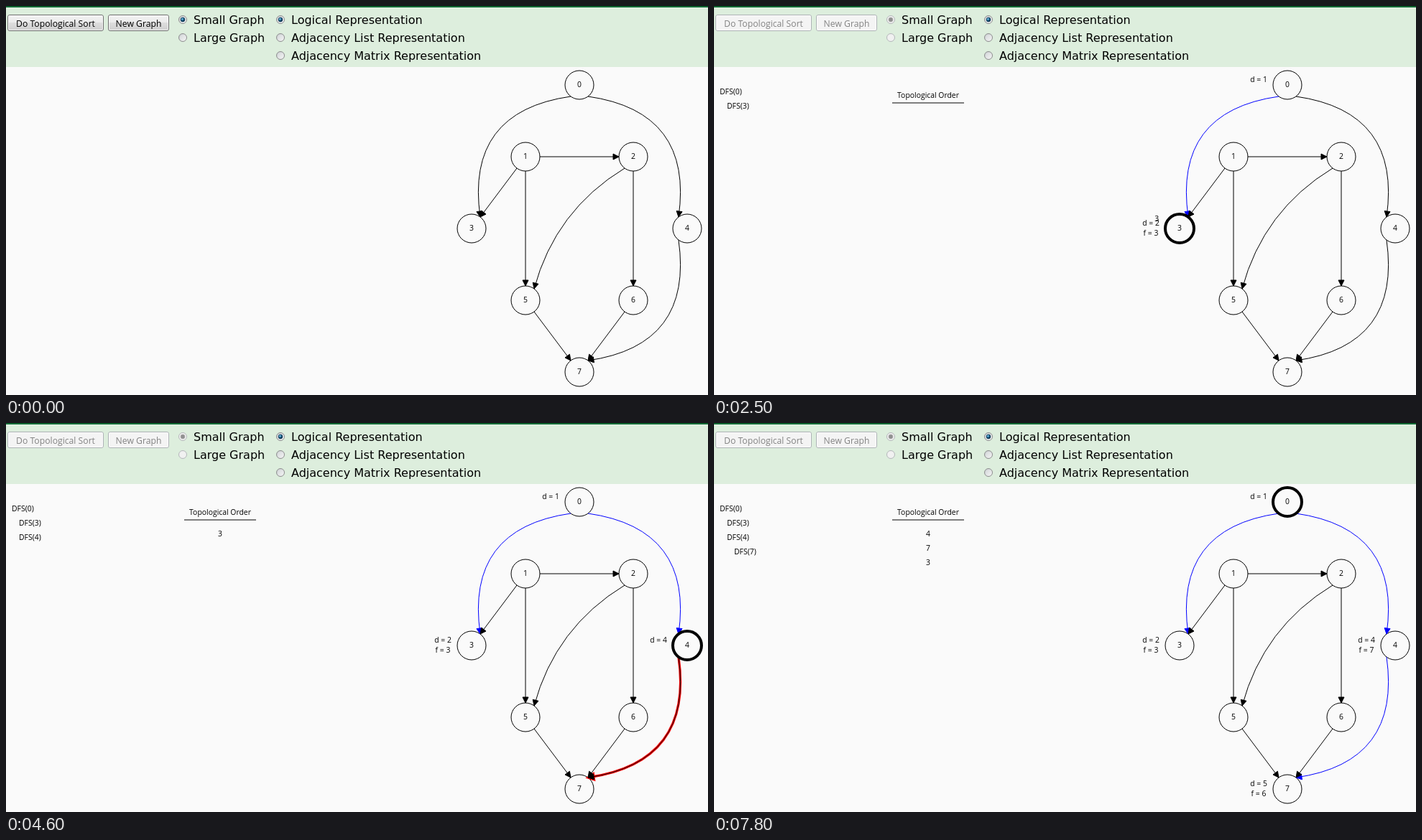
Write an HTML page that moves like this. It is 977 px wide and 542 px high and loops after 8 s.

```html
<!DOCTYPE html>
<html lang="en">
<head>
<meta charset="utf-8">
<title>Topological sort</title>
<style>
  html, body { margin: 0; width: 100%; height: 100%; overflow: hidden; background: #fafafa; }
  svg { display: block; }
  text { font: 10.4px "Open Sans", "Noto Sans", sans-serif; fill: #000; }
  .mid { text-anchor: middle; }
  .option { font: 16px "DejaVu Sans", Verdana, sans-serif; }
  .button rect { fill: url(#face); stroke: #707070; }
  .button text { font-size: 12.2px; text-anchor: middle; }
  .button.hover rect { fill: url(#faceHover); stroke: #3c7fb1; }
  .button.off rect { fill: #f4f4f4; stroke: #adb2b5; }
  .button.off text { fill: #838383; }
  .radio .rim { fill: url(#dish); stroke: #8e8f8f; }
  .radio .dot { fill: url(#bead); stroke: #14405e; stroke-width: .8; }
  .radio.off .rim { fill: #f0f0f0; stroke: #b4b8ba; }
  .radio.off .dot { fill: #909090; stroke: #a4a4a4; }
  .node circle { fill: none; stroke: #000; }
  .edge path { stroke-miterlimit: 10; }
  .line { fill: none; }
</style>
</head>
<body>
<svg id="stage" width="977" height="542" viewBox="0 0 977 542">
  <defs>
    <linearGradient id="face" x2="0" y2="1">
      <stop offset="0" stop-color="#f2f2f2"/><stop offset=".5" stop-color="#ebebeb"/>
      <stop offset=".5" stop-color="#ddd"/><stop offset="1" stop-color="#cfcfcf"/>
    </linearGradient>
    <linearGradient id="faceHover" x2="0" y2="1">
      <stop offset="0" stop-color="#eaf6fd"/><stop offset=".5" stop-color="#d9f0fc"/>
      <stop offset=".5" stop-color="#bee6fd"/><stop offset="1" stop-color="#a7d9f5"/>
    </linearGradient>
    <linearGradient id="dish" x2="1" y2="1">
      <stop offset="0" stop-color="#c4c8cc"/><stop offset="1" stop-color="#f8f8f8"/>
    </linearGradient>
    <radialGradient id="bead" cx=".38" cy=".35">
      <stop offset="0" stop-color="#a5dcf5"/><stop offset=".5" stop-color="#2d7fae"/>
      <stop offset="1" stop-color="#0d3550"/>
    </radialGradient>
  </defs>
  <rect width="977" height="542" fill="#fafafa"/>
  <rect width="977" height="85" fill="#ddeedd"/>
  <rect width="977" height="2" fill="#006633"/>
</svg>
<script>
const LOOP = 8000, TICK = 100;
const RUN_AT = 804, FRAME = 27.71, BLOCK = 12; // ms, ms, frames per block
const R = 20;
const stage = document.getElementById('stage');

function add(tag, attrs, parent = stage, text) {
  const el = document.createElementNS('http://www.w3.org/2000/svg', tag);
  for (const k in attrs) el.setAttribute(k, attrs[k]);
  if (text !== undefined) el.textContent = text;
  parent.appendChild(el);
  return el;
}
const show = (el, on) => { el.style.display = on ? '' : 'none'; };
const label = (text, x, y, cls = 'mid') => add('text', { x, y: y + 4, class: cls }, stage, text);

// Toolbar
function button(text, x, w) {
  const g = add('g', { class: 'button' });
  add('rect', { x: x + .5, y: 12.5, width: w - 1, height: 22, rx: 2.5 }, g);
  add('rect', { x: x + 1.5, y: 13.5, width: w - 3, height: 20, rx: 1.5,
    style: 'fill:none;stroke:#fff;stroke-opacity:.7' }, g);
  add('text', { x: x + w / 2, y: 28.5 }, g, text);
  return g;
}
function radio(text, x, y, checked) {
  const g = add('g', { class: 'radio' });
  add('circle', { cx: x, cy: y, r: 5.5, class: 'rim' }, g);
  add('circle', { cx: x, cy: y, r: 4, fill: '#f4f4f4', opacity: .25 }, g);
  if (checked) add('circle', { cx: x, cy: y, r: 2.9, class: 'dot' }, g);
  add('text', { x: x + 15, y: y + 6, class: 'option' }, g, text);
  return g;
}
const sortButton = button('Do Topological Sort', 2, 134);
const locked = [
  sortButton,
  button('New Graph', 142, 85),
  radio('Small Graph', 246, 19, true),
  radio('Large Graph', 246, 44)
];
radio('Logical Representation', 382, 19, true);
radio('Adjacency List Representation', 382, 44);
radio('Adjacency Matrix Representation', 382, 69);

// Graph
const nodes = [[798, 110], [723, 210], [873, 210], [648, 310],
               [948, 310], [723, 410], [873, 410], [798, 510]];
nodes.forEach(([x, y], i) => {
  const g = add('g', { class: 'node' });
  add('circle', { cx: x, cy: y, r: R }, g);
  add('text', { x, y: y + 3, class: 'mid' }, g, i);
});

function edge(a, b, curve = 0) {
  const [ax, ay] = nodes[a], [bx, by] = nodes[b];
  const len = Math.hypot(bx - ax, by - ay);
  const ux = (bx - ax) / len, uy = (by - ay) / len;
  const x1 = ax + ux * R, y1 = ay + uy * R;
  const x2 = bx - ux * R, y2 = by - uy * R;
  const cx = (x1 + x2) / 2 - (y2 - y1) * curve;
  const cy = (y1 + y2) / 2 + (x2 - x1) * curve;
  const d = Math.hypot(x2 - cx, y2 - cy), vx = (x2 - cx) / d, vy = (y2 - cy) / d;
  const px = x2 - vx * 8, py = y2 - vy * 8;
  const line = `M${x1} ${y1}Q${cx} ${cy} ${x2} ${y2}`;
  const head = `M${x2} ${y2}L${px - vy * 4} ${py + vx * 4}L${px + vy * 4} ${py - vx * 4}Z`;
  const layer = () => {
    const g = add('g', { class: 'edge' });
    add('path', { d: line, class: 'line' }, g);
    add('path', { d: head }, g);
    return g;
  };
  const glow = layer(), top = layer();
  glow.setAttribute('stroke', '#f00');
  glow.setAttribute('fill', '#f00');
  return { glow, top };
}
// [edge, block of its red highlight]; it joins the tree one block later
const e03 = edge(0, 3, .5), e04 = edge(0, 4, -.5);
const e12 = edge(1, 2), e13 = edge(1, 3), e15 = edge(1, 5);
const e25 = edge(2, 5, .2), e26 = edge(2, 6);
const e47 = edge(4, 7, -.5), e57 = edge(5, 7), e67 = edge(6, 7);
const edges = [[e03, 1], [e04, 8], [e47, 11],
  ...[e12, e13, e15, e25, e26, e57, e67].map(e => [e, Infinity])];

// Labels: [element, first block, last block]
const timed = [];
const timeLabel = (el, from, to = Infinity) => timed.push([el, from, to]);

timeLabel(label('Topological Order', 298, 124), 0);
timeLabel(add('path', { d: 'M248 135h100', stroke: '#555', 'stroke-width': 1.7 }), 0);

// [vertex, indent, row, discover time, discover block, finish time, finish block]
[[0, 8, 0, 1, 0], [3, 18, 1, 2, 3, 3, 4], [4, 18, 2, 4, 10, 7, 18], [7, 28, 3, 5, 13, 6, 14]]
  .forEach(([v, x, row, d, dBlock, f, fBlock]) => {
    const [nx, ny] = nodes[v];
    timeLabel(label(`DFS(${v})`, x, 119 + row * 20, ''), dBlock);
    timeLabel(label(`d = ${d}`, nx - 40, ny - 8), dBlock);
    if (f) timeLabel(label(`f = ${f}`, nx - 40, ny + 6), fBlock);
  });

// [vertex, x, y, block]
[[3, 28, 159, 6], [7, 38, 199, 16], [4, 28, 199, 20]].forEach(([v, x, y, b]) =>
  timeLabel(label(`Returning from recursive call: DFS(${v})`, x, y, ''), b, b));

const order = [[3, 5], [7, 15], [4, 19]].map(([v, block]) => {
  const el = label(v, 0, 0);
  timeLabel(el, block);
  return { el, block, from: nodes[v] };
});

const ring = add('circle', { r: R, fill: 'none', stroke: '#000', 'stroke-width': 4 });
timeLabel(ring, 0);
// [from, to, block]
const path = [[0, 3, 2], [3, 0, 6], [0, 4, 9], [4, 7, 12], [7, 4, 16], [4, 0, 20]];

const mix = (a, b, p) => a + (b - a) * p;

function draw(time) {
  const t = Math.floor(time / TICK) * TICK;
  const frame = Math.floor((t - RUN_AT) / FRAME);
  const block = Math.floor(frame / BLOCK);
  const progress = b => Math.min(1, Math.max(0, (frame - b * BLOCK) / (BLOCK - 1)));

  locked.forEach(el => el.classList.toggle('off', t >= 800));
  sortButton.classList.toggle('hover', t >= 500 && t < 800);

  timed.forEach(([el, from, to]) => show(el, block >= from && block <= to));

  edges.forEach(([{ glow, top }, red]) => {
    const color = block > red ? '#00f' : '#000';
    top.setAttribute('stroke', color);
    top.setAttribute('fill', color);
    show(glow, block === red);
    if (block === red) glow.setAttribute('stroke-width', 3 + (frame - red * BLOCK) / 14);
  });

  order.forEach(({ el, block: b, from }, i) => {
    const p = progress(b);
    const shift = order.slice(i + 1).reduce((s, o) => s + 20 * progress(o.block), 0);
    el.setAttribute('x', mix(from[0], 298, p));
    el.setAttribute('y', mix(from[1], 154, p) + shift + 4);
  });

  const [a, b, start] = path.filter(s => s[2] <= block).pop() || path[0];
  const p = progress(start);
  ring.setAttribute('cx', mix(nodes[a][0], nodes[b][0], p));
  ring.setAttribute('cy', mix(nodes[a][1], nodes[b][1], p));
}

const begin = performance.now();
function tick() {
  draw((performance.now() - begin) % LOOP);
  requestAnimationFrame(tick);
}
tick();
</script>
</body>
</html>
```
